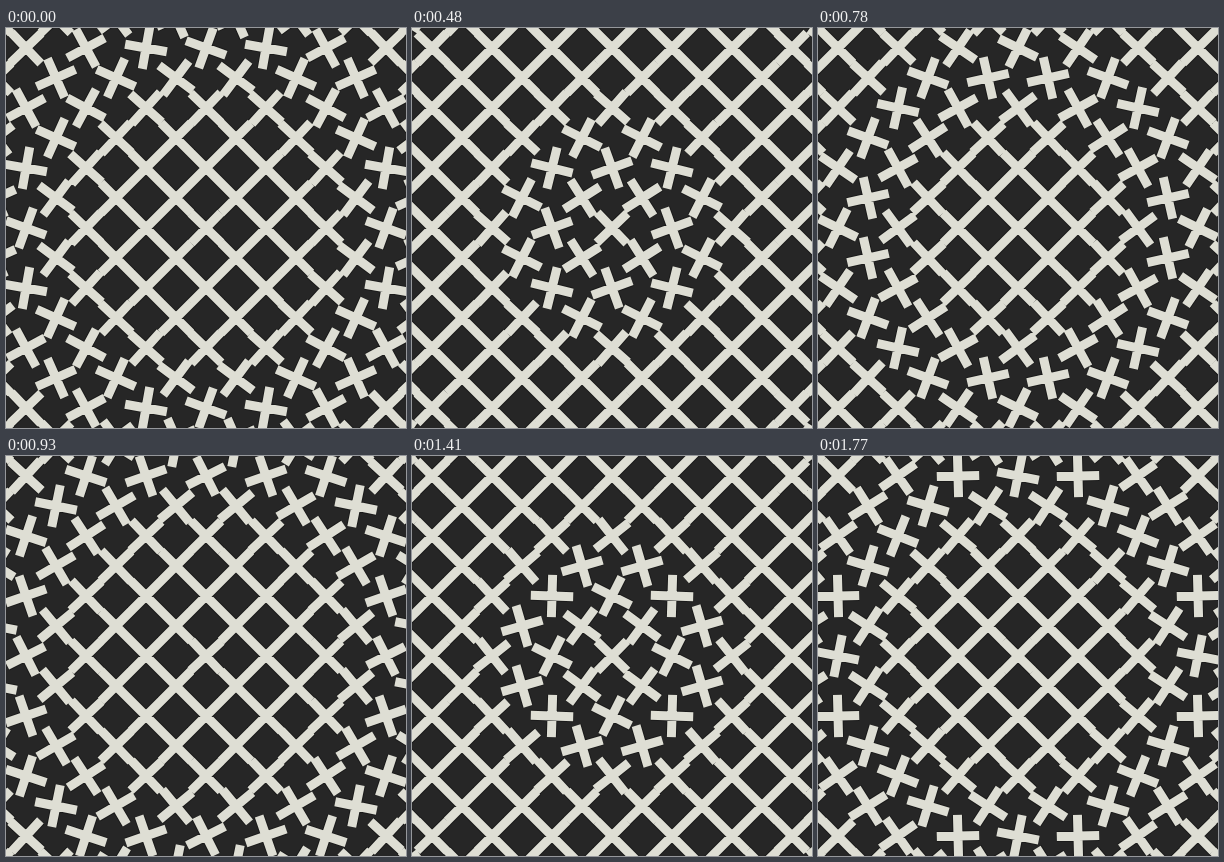
An HTML page with a canvas that plays this animation: 400x400 px, repeating every 1800 ms.

```html
<!DOCTYPE html>
<html lang="en">
<head>
<meta charset="utf-8">
<title>Turning crosses</title>
<style>
html, body { margin: 0; width: 100%; height: 100%; overflow: hidden; background: #262626; }
canvas { display: block; }
</style>
</head>
<body>
<canvas id="stage" width="400" height="400"></canvas>
<script>
const ctx = document.getElementById('stage').getContext('2d');
const LOOP = 1800, STEP = 30, TURN = LOOP / 2;
const GAP = 30, ARM = GAP / Math.SQRT2;
const SPEED = 0.286;       // ripple speed, px per ms
const CENTRE_TIME = 209;   // when the middle cross stands upright

// Sharp start, softer finish.
const ease = p => p < 0.5 ? 0.5 * (2 * p) ** 6.3 : 1 - 0.5 * (2 - 2 * p) ** 4;

// Each cross swings from +45 to -45 degrees and back, later the further out it is.
function angleAt(t, r) {
  const phase = (t - CENTRE_TIME - r / SPEED) / TURN + 0.5;
  const turn = Math.floor(phase);
  const swing = 0.5 - ease(phase - turn);
  return (turn % 2 ? -swing : swing) * Math.PI / 2;
}

function addCross(path, x, y, angle) {
  const dx = ARM * Math.cos(angle), dy = ARM * Math.sin(angle);
  path.moveTo(x - dx, y - dy);
  path.lineTo(x + dx, y + dy);
  path.moveTo(x + dy, y - dx);
  path.lineTo(x - dy, y + dx);
}

function stroke(path, color, width) {
  ctx.strokeStyle = color;
  ctx.lineWidth = width;
  ctx.stroke(path);
}

function draw(now) {
  const t = Math.floor((now % LOOP) / STEP) * STEP;
  const path = new Path2D();
  for (let i = -8; i <= 8; i++) {
    for (let j = -8; j <= 8; j++) {
      if ((i + j) % 2) continue;
      addCross(path, 200 + i * GAP, 200 + j * GAP, angleAt(t, GAP * Math.hypot(i, j)));
    }
  }
  ctx.fillStyle = '#262626';
  ctx.fillRect(0, 0, 400, 400);
  stroke(path, '#1a1a1a', 11);  // dark rim
  stroke(path, '#deded4', 9);
  requestAnimationFrame(draw);
}
requestAnimationFrame(draw);
</script>
</body>
</html>
```
